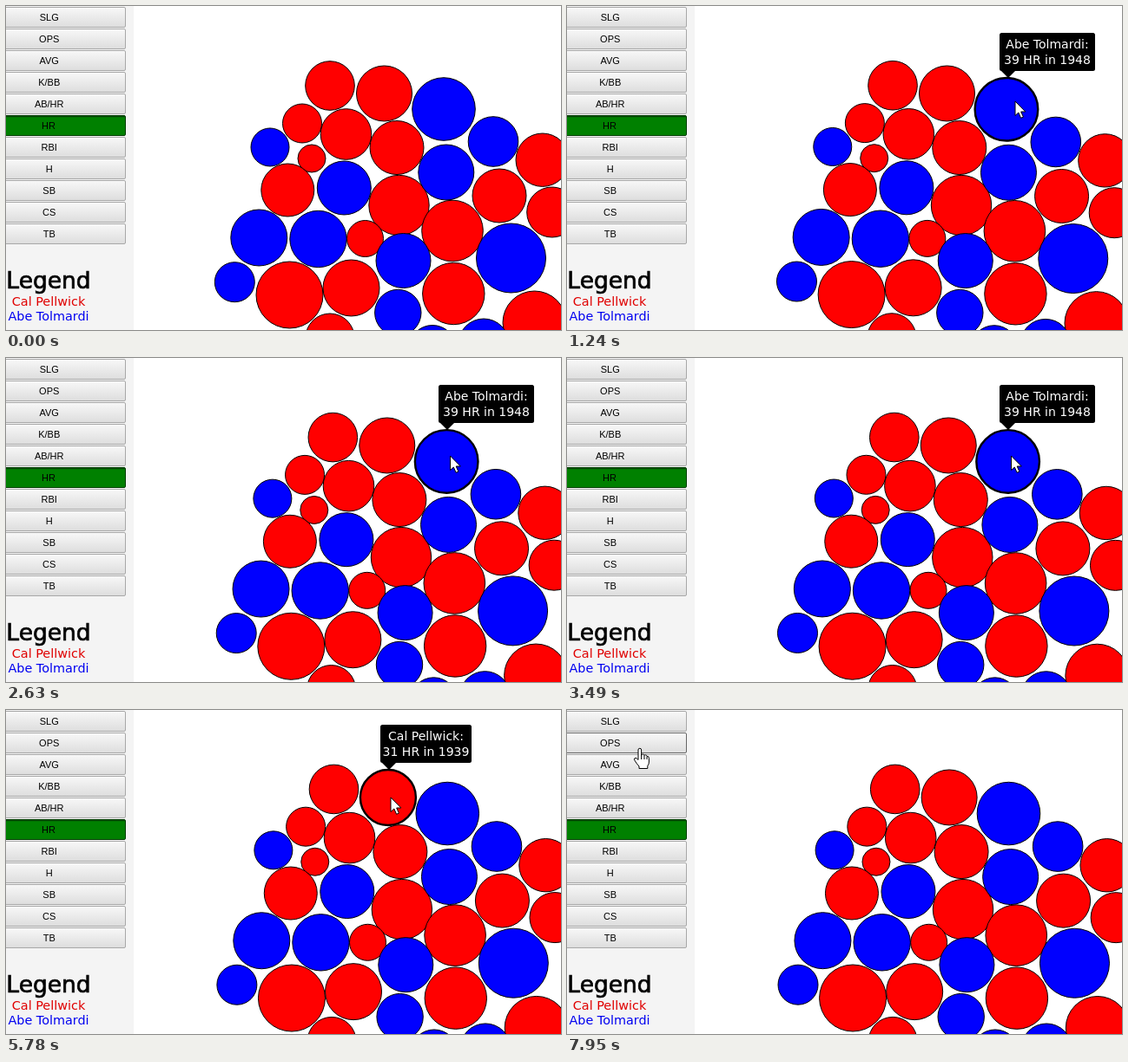
Recreate the animation shown at these times as an HTML page. Size 639 by 374 pixels, loop 8000 ms.

```html
<!DOCTYPE html>
<html lang="en">
<head>
<meta charset="utf-8">
<title>Home run bubbles</title>
<style>
  html, body { margin: 0; width: 100%; height: 100%; overflow: hidden; background: #fff; }
  svg { display: block; width: 639px; height: 374px; }
  text { text-anchor: middle; }
  .btn { font: 11px "Liberation Sans", Arial, sans-serif; }
  .wide { font: 14px "DejaVu Sans", sans-serif; }
</style>
</head>
<body>
<svg id="stage" viewBox="0 0 639 374">
  <defs>
    <linearGradient id="face" x1="0" y1="0" x2="0" y2="1">
      <stop offset="0" stop-color="#f8f8f8"/>
      <stop offset="1" stop-color="#dddddd"/>
    </linearGradient>
  </defs>
</svg>
<script>
const LOOP = 8000;
const RED_NAME = "Cal Pellwick", BLUE_NAME = "Abe Tolmardi";
const stage = document.getElementById("stage");

function add(parent, tag, attrs, text) {
  const node = document.createElementNS("http://www.w3.org/2000/svg", tag);
  for (const key in attrs) node.setAttribute(key, attrs[key]);
  if (text) node.textContent = text;
  parent.appendChild(node);
  return node;
}

// Bubbles: x, y, radius at time zero
const reds = [
  [373, 92, 28.3], [435.5, 101, 32], [341, 135.5, 22.5], [391.5, 148, 29.3],
  [450, 163.5, 31], [352, 176, 16], [324.3, 212.5, 30.5], [452.5, 230, 34.7],
  [514, 259.5, 35.3], [568, 219, 31], [617.7, 177.7, 30.7], [628.7, 238, 29],
  [413.5, 268.5, 21], [326.5, 333.5, 38.5], [397.5, 325.5, 32.5],
  [515.3, 332, 35.7], [608.5, 365.5, 36.5], [373, 383, 28]
];
const blues = [
  [504, 119, 36.3], [561, 156.5, 28.8], [506.8, 192, 32], [304, 163, 22],
  [389.3, 210, 31], [291.3, 267.5, 32.5], [359.5, 269, 32.7], [457.5, 294, 31.5],
  [581.5, 291, 40], [263.3, 318.7, 23], [451.3, 354, 26.7],
  [491, 395.5, 27], [550, 390, 29]
];
const bubbleLayer = add(stage, "g", { stroke: "#000" });
const makeBubble = fill => ([x, y, r]) =>
  ({ x, y, r, node: add(bubbleLayer, "circle", { r, fill }) });
const bubbles = [...reds.map(makeBubble("#f00")), ...blues.map(makeBubble("#00f"))];

// Sidebar
add(stage, "rect", { width: 147, height: 374, fill: "#f4f4f4" });
const labels = ["SLG", "OPS", "AVG", "K/BB", "AB/HR", "HR", "RBI", "H", "SB", "CS", "TB"];
const buttons = labels.map((label, i) => {
  const on = label === "HR", y = 1.5 + i * 25;
  const node = add(stage, "rect", {
    x: -39.5, y, width: 177, height: 23, rx: 1.5, fill: on ? "#008000" : "url(#face)"
  });
  if (on) add(stage, "path", { d: `M-39 ${y + 1}H137`, stroke: "#004800", "stroke-width": 1.5 });
  add(stage, "text", { x: on ? 49 : 49.7, y: y + 15.5, class: "btn" }, label);
  return { node, y, idle: on ? "#003c00" : "#a8a8a8" };
});
const legend = (y, size, fill, text, stroke = "none") =>
  add(stage, "text", { x: 49, y, class: "wide", fill, stroke, style: `font-size:${size}px` }, text);
legend(326, 26.5, "#000", "Legend", "#000").setAttribute("stroke-width", 0.7);
legend(345.5, 14.4, "#e00000", RED_NAME);
legend(362.5, 14.4, "#0000f0", BLUE_NAME);

// Tooltips, keyed by bubble
function makeTip(bubble, x, y, w, name, stat) {
  const node = add(stage, "g", { transform: `translate(${x} ${y})` });
  add(node, "rect", { width: w, height: 44, rx: 2.5 });
  add(node, "path", { d: "M1.5 43.5H18.5L10 52Z" });
  const line = (ty, text) =>
    add(node, "text", { x: w / 2, y: ty, fill: "#fff", class: "wide" }, text);
  line(18, name + ":");
  line(36, stat);
  return { bubble, node };
}
const tips = [
  makeTip(bubbles[reds.length], 498, 31, 110, BLUE_NAME, "39 HR in 1948"),
  makeTip(bubbles[1], 431, 17, 105, RED_NAME, "31 HR in 1939"),
  makeTip(bubbles[0], 368, 11, 105, RED_NAME, "23 HR in 1940")
];

// Pointer
const ink = { fill: "#fff", stroke: "#000", "stroke-linejoin": "round" };
const pointer = add(stage, "g", {});
const arrow = add(pointer, "path", { ...ink, d: "M0 0V16.5L3.8 13L6.6 19.3L9.4 18.1L6.7 12H11.8Z" });
const hand = add(pointer, "g", {});
add(hand, "path", { ...ink, d:
  "M-2 13.5V2Q-2 .3 -.2 .3T1.6 2V8.2Q1.8 7 3.3 7T5 8.6Q5.2 7.6 6.5 7.8T8 9.6" +
  "Q10.4 9 10.4 11.5V16Q10.4 18.5 8.8 20.5V23.5H-1V21Q-3.5 18.5 -6.5 13.6Q-7 11.5 -5 11.4Q-3.6 11.6 -2 13.5Z" });
add(hand, "path", { d: "M1.6 8V13M5 9V13M8 10V13", fill: "none", stroke: "#000" });

// Pointer stops: time, x, y
const route = [
  [900, 640, 98], [1200, 516, 110], [1320, 516, 110], [1600, 511.5, 113],
  [3600, 511.5, 113], [4000, 443, 101], [6950, 443, 101],
  [7500, 100, 60], [7720, 100, 60], [7850, 84, 44]
];

function pointerAt(t) {
  const i = route.findIndex(stop => stop[0] > t);
  if (i === 0) return null;
  if (i < 0) return route[route.length - 1].slice(1);
  const [t0, x0, y0] = route[i - 1], [t1, x1, y1] = route[i];
  const k = (t - t0) / (t1 - t0), e = k * k * (3 - 2 * k);
  return [x0 + (x1 - x0) * e, y0 + (y1 - y0) * e];
}

const show = (node, on) => node.setAttribute("visibility", on ? "visible" : "hidden");

function draw(t) {
  const at = pointerAt(t);
  // The cluster settles by turning slightly around a point below the stage
  const turn = 0.0091 * (1 - Math.exp(-t / 2300));
  let hot = null;
  for (const b of bubbles) {
    const x = b.x - turn * (b.y - 628), y = b.y + turn * (b.x - 440);
    const over = at && Math.hypot(at[0] - x, at[1] - y) < b.r;
    if (over) hot = b;
    b.node.setAttribute("cx", x);
    b.node.setAttribute("cy", y);
    b.node.setAttribute("stroke-width", over ? 2.4 : 1);
  }
  for (const tip of tips) show(tip.node, tip.bubble === hot);
  const inMenu = at && at[0] < 138;
  for (const b of buttons) {
    const over = inMenu && at[1] >= b.y - 0.5 && at[1] < b.y + 24.5;
    b.node.setAttribute("stroke", over ? "#666" : b.idle);
  }
  show(arrow, at && !inMenu);
  show(hand, inMenu);
  if (at) pointer.setAttribute("transform", `translate(${at[0]} ${at[1]})`);
}

const start = performance.now();
function tick() {
  draw((performance.now() - start) % LOOP);
  requestAnimationFrame(tick);
}
tick();
</script>
</body>
</html>
```
